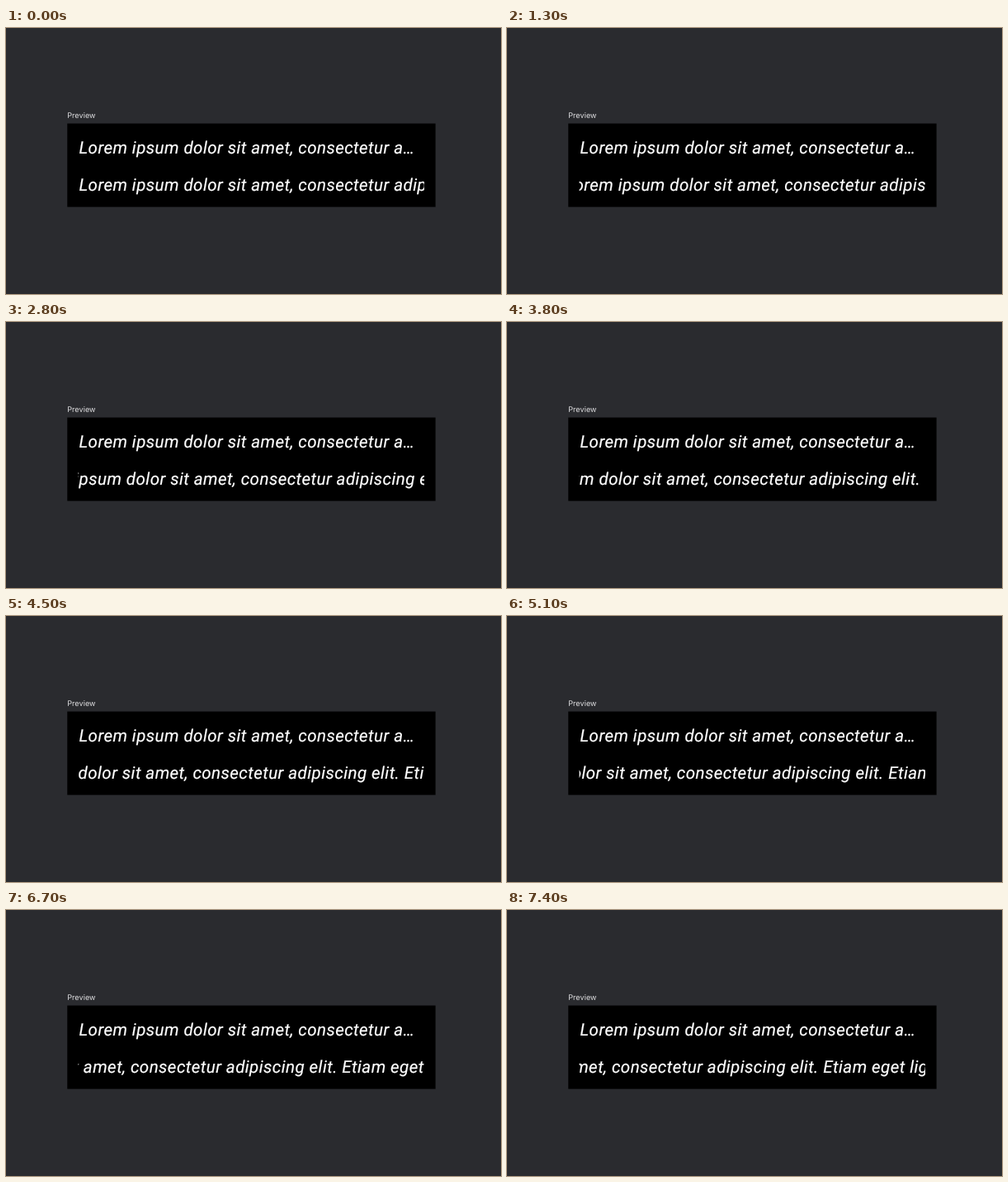
Write an HTML page that moves like this. It is 600 px wide and 322 px high and loops after 7.5 s.

```html
<!DOCTYPE html>
<html lang="en">
<head>
<meta charset="utf-8">
<title>Marquee preview</title>
<style>
  html, body { margin: 0; width: 100%; height: 100%; overflow: hidden; background: #2a2b2f; }
  svg { display: block; }
  text { text-rendering: geometricPrecision; }
  .label { font: 9.2px Inter, sans-serif; fill: #dcdcde; }
  .line {
    font: italic 400 20.6px Roboto, sans-serif;
    letter-spacing: 0.43px;
    fill: #fff;
    stroke: #fff;
    stroke-width: 0.2px;
  }
</style>
</head>
<body>
<svg width="600" height="322" viewBox="0 0 600 322">
  <clipPath id="window"><rect x="87.6" y="170" width="419.4" height="40"/></clipPath>
  <text class="label" x="74.2" y="109">Preview</text>
  <rect x="74.3" y="115.6" width="446.3" height="101" fill="#000"/>
  <text class="line" x="88.4" y="152">Lorem ipsum dolor sit amet, consectetur a…</text>
  <g clip-path="url(#window)">
    <text class="line" id="marquee" x="88.4" y="197">Lorem ipsum dolor sit amet, consectetur adipiscing elit. Etiam eget ligula eu lectus</text>
  </g>
</svg>
<script>
  const LOOP = 7500, STEP = 100;
  const START = 772, SPEED = 0.0343; // ms, px per ms
  const marquee = document.getElementById('marquee');

  function draw() {
    const now = performance.now() % LOOP;
    const t = Math.floor(now / STEP) * STEP;
    const shift = Math.max(0, t - START) * SPEED;
    marquee.setAttribute('transform', `translate(${-shift} 0)`);
    requestAnimationFrame(draw);
  }
  draw();
</script>
</body>
</html>
```
